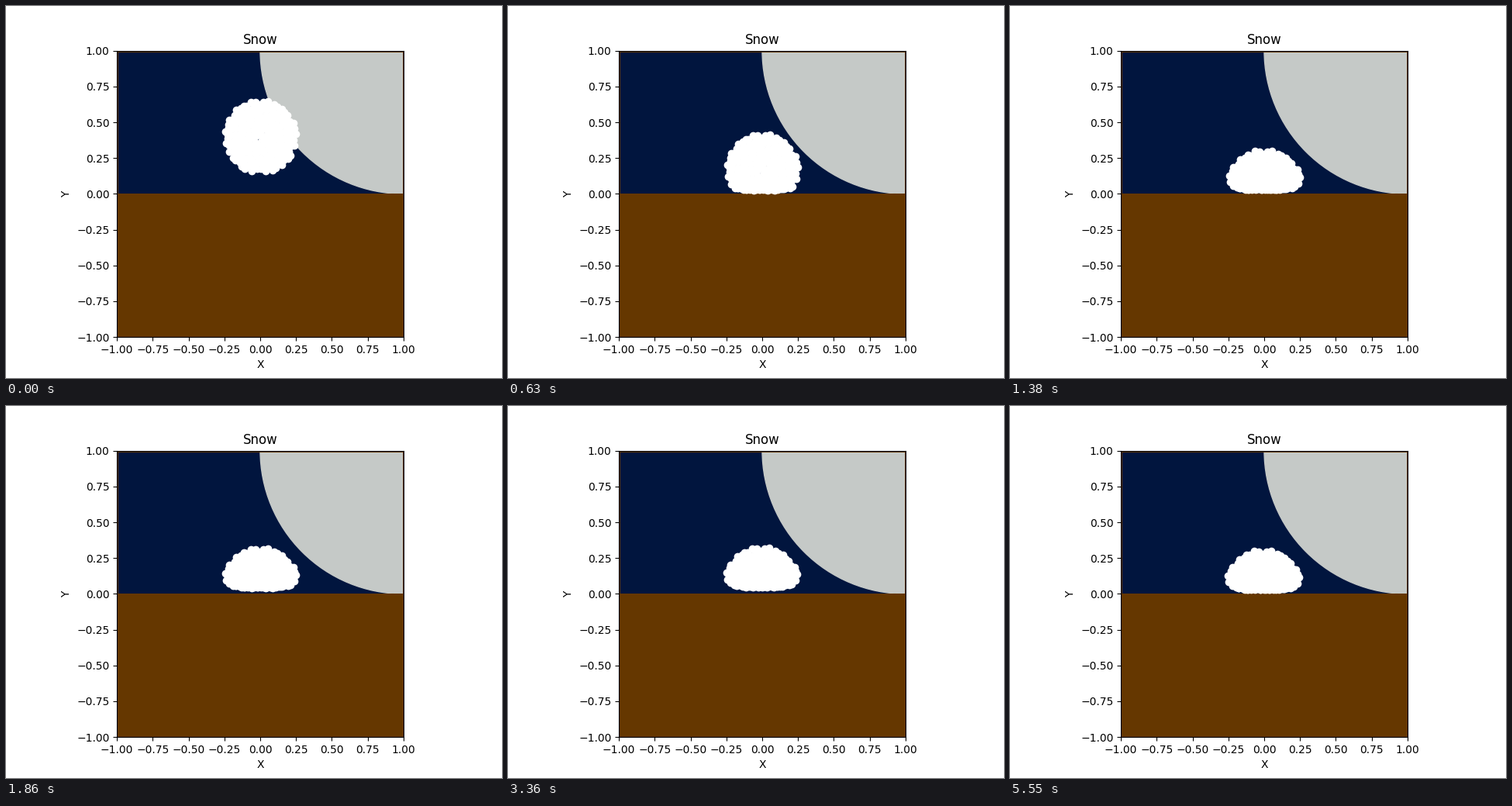
A matplotlib script that plays this animation: 640x480 px, repeating every 6270 ms.

```python
import numpy as np
import matplotlib.pyplot as plt
from matplotlib.animation import FuncAnimation
from matplotlib.patches import Circle, Rectangle

FRAMES, INTERVAL = 209, 30
SPEED = 0.0111           # fall per frame
BALL_Y, BALL_R = 0.4, 0.25
FLAKES = 300


def smooth(t, start, end):
    p = np.clip((t - start) / (end - start), 0, 1)
    return p * p * (3 - 2 * p)


def make_ball():
    """Jittered sunflower spiral: an even disc with a few small openings."""
    rng = np.random.default_rng(4)
    k = np.arange(FLAKES)
    angle = k * np.pi * (3 - np.sqrt(5))
    radius = BALL_R * np.sqrt((k + 0.5) / FLAKES)
    x, y = radius * np.array([np.cos(angle), np.sin(angle)])
    x, y = np.array([x, y]) + rng.uniform(-0.011, 0.011, (2, FLAKES))
    shrink = np.minimum(1, BALL_R / np.hypot(x, y))
    return x * shrink, BALL_Y + y * shrink


X0, Y0 = make_ball()
LEVEL = (Y0 - BALL_Y + BALL_R) / (2 * BALL_R)
REST = 0.025 + 0.04 * LEVEL + 0.24 * LEVEL ** 2
DROP = Y0 - REST
BRAKE = 0.112 * LEVEL                 # distance over which a flake slows down
BRAKE_START = (DROP - BRAKE) / SPEED
BRAKE_TIME = np.maximum(2 * BRAKE / SPEED, 0.01)


def snow(t):
    p = np.clip((t - BRAKE_START) / BRAKE_TIME, 0, 1)
    fall = SPEED * np.minimum(t, BRAKE_START) + BRAKE * (2 * p - p * p)
    hop_t = min(t, 160)
    hop = (0.0215 - 4.6e-6 * (hop_t - 95) ** 2) * smooth(t, 42, 64)
    settle = 0.0006 * np.clip((t - 174) / 11, 0, 1)
    drift = 0.007 * np.clip((t - 60) / 60, 0, 1)
    return X0 - drift, Y0 - fall + hop - settle


fig, ax = plt.subplots(figsize=(6.4, 4.8), dpi=100)
ax.set(xlim=(-1, 1), ylim=(-1, 1), aspect="equal",
       title="Snow", xlabel="X", ylabel="Y")
ax.set_xticks(np.linspace(-1, 1, 9))
ax.set_yticks(np.linspace(-1, 1, 9))
ax.set_facecolor("xkcd:navy")
ax.add_patch(Circle((1, 1), 1, color="xkcd:silver", lw=1))
ax.add_patch(Rectangle((-1, -1), 2, 1, color="xkcd:brown", lw=0))
ax.add_patch(Rectangle((-1, -1), 2, 2, fill=False, ec="xkcd:brown", lw=2))
flakes, = ax.plot([], [], "o", color="white", markersize=6)


def update(i):
    flakes.set_data(*snow(i))
    return flakes,


anim = FuncAnimation(fig, update, frames=FRAMES, interval=INTERVAL,
                     repeat=True, repeat_delay=0)
plt.show()
```
